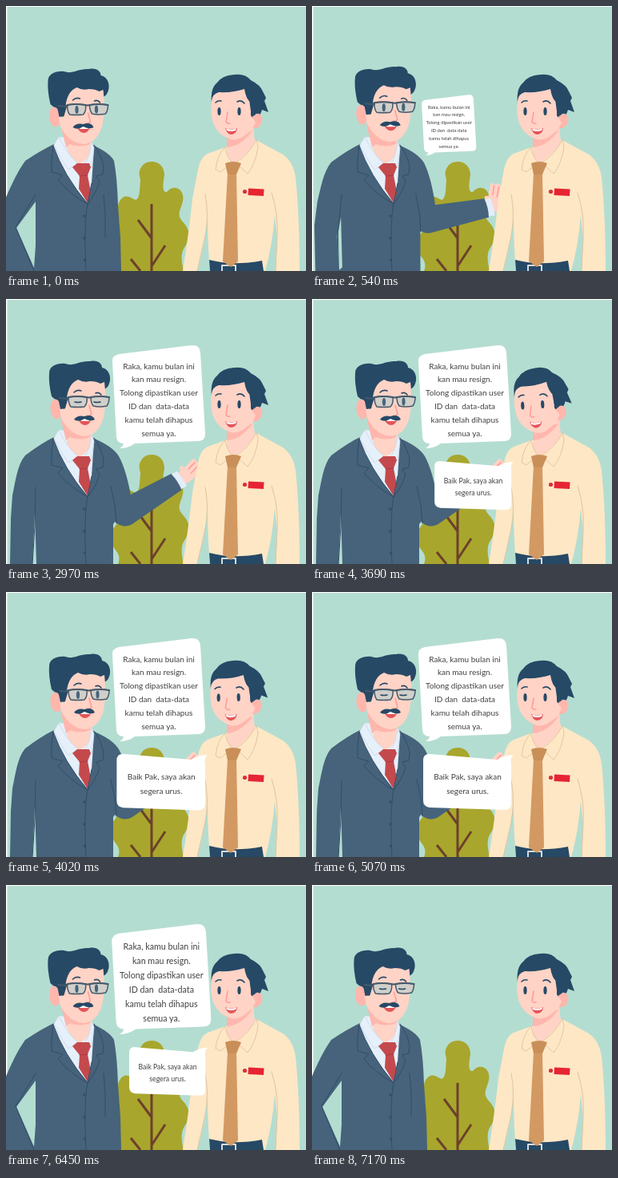
Write an HTML page that moves like this. It is 375x332 px and loops after 7.2 s.

```html
<!DOCTYPE html>
<html lang="id">
<head>
<meta charset="utf-8">
<style>
html, body { margin: 0; width: 100%; height: 100%; overflow: hidden; background: #fff; }
svg { display: block; width: 375px; height: 332px; }
path { stroke-linecap: round; stroke-linejoin: round; }
text { font: 10px Lato, Carlito, sans-serif; fill: #404040; text-anchor: middle; white-space: pre; }
.sky { fill: #b4ddd1; }
.navy { fill: #264966; }
.skin { fill: #ffd3c5; }
.shade { fill: #ffb6ad; }
.suit { fill: #46637b; }
.cream { fill: #fee7c5; }
.seam { fill: none; stroke: #304e69; stroke-width: 1; }
.fold { fill: none; stroke: #dcc5a1; stroke-width: 1; }
.brow { fill: none; stroke: #264966; stroke-width: 1.6; }
.nose { fill: none; stroke: #ff9d99; stroke-width: 1.6; }
.twig { fill: none; stroke: #6c412b; stroke-width: 3; stroke-linecap: butt; }
</style>
</head>
<body>
<svg viewBox="0 0 375 332">
  <rect class="sky" x="1.5" y="1" width="374" height="331"/>

  <g id="plant">
    <path fill="#a8a62d" d="M182 195C192 195 198 202 198 212C196 223 195 234 201 233C206 227 213 226 218 231C224 238 221 246 218 254C214 264 219 268 224 274C231 283 229 293 224 301C218 309 219 318 222 332H140C143 325 141 320 138 316C130 307 131 296 134 288C138 282 143 278 141 268C138 258 139 244 146 240C152 236 157 241 162 243C168 241 167 228 168 218C167 212 165 208 169 202Q173 195 182 195Z"/>
    <path class="twig" d="M182 248V332M182 291L165 268M182 326L199 300M168 332L156 317"/>
  </g>

  <g id="boss">
    <g id="forearm">
      <g id="hand">
        <path class="skin" d="M78 -8L86 -9L88 -14Q92 -15 92 -10L106 -14Q111 -13 109 -9L112 -5L109 1Q100 8 92 8L78 8Z"/>
        <path class="nose" stroke-width="1" d="M96 -6L107 -9M96 0L108 -3"/>
      </g>
      <path fill="#e3eefa" d="M72 -11H82Q84 0 83 11H72Z"/>
      <path class="suit" d="M0 -17L74 -12Q77 0 75 12L0 17A17 17 0 0 1 0 -17Z"/>
    </g>
    <path id="jacket" class="suit"/>
    <path id="gap" class="sky"/>
    <path id="sleeveL" class="seam"/>
    <path id="sleeveR" class="seam"/>
    <g id="chest">
      <path fill="#e6f0fa" d="M66 164L59 175Q72 212 102 247L107 222L110 178L106 168Z"/>
      <path class="skin" d="M70 148L77 182Q83 195 91 198Q101 194 105 185L107 158Z"/>
      <path class="shade" d="M68 148L75 177L80 173Q92 178 105 173L107 158Z"/>
      <path fill="#e6f0fa" stroke="#c5d5e5" stroke-width=".7" d="M66 164L60 174Q66 188 78 205L90 197Q77 187 66 164ZM107 170L110 178L107 203L99 197Q105 188 107 170Z"/>
      <path fill="#c4494d" d="M83 202L89 197H104L106 202L102 212L106 233L102 247L91 229L92 213Z"/>
      <path fill="none" stroke="#a63d45" d="M92 213L102 212"/>
      <path class="seam" d="M59 175Q56 192 57 208L71 212L65 218Q80 236 102 248L107 222M110 174Q119 186 122 201L121 211L113 213L117 220Q112 236 102 248M102 248Q97 275 100 332M59 175Q72 212 102 248"/>
      <g fill="#304e69"><circle cx="98" cy="263" r="1.700"/><circle cx="98" cy="291" r="1.700"/><circle cx="98.500" cy="318" r="1.700"/></g>
    </g>
    <g id="bossHead">
      <path class="navy" d="M64 130L56 123Q52 106 53 94C53 85 63 81 73 82C83 86 91 78 104 79C114 77 119 82 119 87C128 89 131 99 128 107Q126 113 121 114L75 140L67 137Z"/>
      <ellipse class="shade" cx="61.500" cy="139" rx="7" ry="12.500" transform="rotate(-6 61 139)"/>
      <path class="skin" d="M66 138L72 139L75 125Q77 107 89 102Q96 106 104 104Q112 104 117 107L122 105Q125 128 121 149Q115 171 98 173Q79 172 68 150Z"/>
      <path class="navy" d="M64 124H77L73 138L67 139Z"/>
      <path class="brow" d="M84 118Q88 114 93 116M111 119Q115 117 118 121"/>
      <path class="nose" d="M103 134L106 145Q104 148 101 147"/>
      <g fill="#d0cfca" stroke="#46596b" stroke-width="1.500">
        <path d="M77 124Q88 122 100 124Q101 132 97 136Q88 137 80 136Q77 132 77 124ZM105 124Q116 122 128 124Q128 131 125 135Q116 137 108 135Q105 131 105 124Z"/>
        <path fill="none" stroke-width="2" d="M77 124Q88 122 100 124Q102.500 125 105 124Q116 122 128 124M77 126L66 125"/>
      </g>
      <g id="eyesOpen" fill="#47647b"><ellipse cx="89" cy="130" rx="2.100" ry="5"/><ellipse cx="113.500" cy="129.500" rx="2.100" ry="5"/></g>
      <path id="eyesShut" class="brow" d="M85 130Q89 131 93 130M109 130Q113 131 117 130"/>
      <path fill="#e2555a" d="M90 153H105Q103 159 97 159Q92 158 90 153Z"/>
      <path fill="#fff" d="M91 151H104L103 154H93Z"/>
      <path class="navy" d="M84 152Q88 146 97 148Q107 145 110 152Q105 155 97 151Q90 156 84 152Z"/>
    </g>
  </g>

  <g id="clerk">
    <path class="cream" d="M274 177L252 185Q243 189 240 205L233 242Q229 280 221 332H367Q367 265 362 215Q359 195 346 186L313 168Z"/>
    <path class="sky" d="M252 264Q249 295 239 332H255Q252 300 252 264ZM336 262L339 290L337 332H324Q333 300 336 262Z"/>
    <path class="navy" d="M254 318Q284 326 320 319L322 332H255Z"/>
    <path fill="none" stroke="#d8dce0" stroke-width="2" d="M270 333V325H287V333"/>
    <path class="fold" d="M249 236Q254 262 249 288L239 332M332 234Q341 262 339 290L337 332"/>
    <path class="skin" d="M276 158V185Q278 194 285 196Q300 188 311 171L309 150Z"/>
    <path class="shade" d="M276 164V177Q294 176 308 156Z"/>
    <path class="cream" stroke="#dcc5a1" stroke-width=".9" d="M274 177Q264 186 262 205L268 208L283 196Q276 190 274 177ZM313 168Q302 188 287 196L302 210Q312 198 315 177Z"/>
    <path fill="#d39962" d="M277 209H288L290 320L281 327L271 320Z"/>
    <path fill="#c98f58" d="M274 197Q284 193 294 197L288 211H277Z"/>
    <path fill="#e62434" d="M303 228.500L322.500 229.500L322 238L302.500 237Z"/>
    <circle cx="298.500" cy="232.500" r="2.600" fill="#d8323c"/>
    <g id="clerkHead">
      <path class="navy" d="M257 122Q255 103 264 96Q270 87 285 86Q299 84 306 93Q318 99 321 107L325 115L323 119L328 133L320 130Q318 138 312 139L300 140L290 112Z"/>
      <ellipse class="shade" cx="313" cy="144" rx="7" ry="9.500" transform="rotate(25 313 144)"/>
      <path class="skin" d="M257 119Q258 110 266 108Q283 109 298 104Q300 117 306 121L306 137L312 146Q308 156 300 161Q291 169 281 167Q265 162 259 147Q255 135 257 119Z"/>
      <path class="navy" d="M304 117L312 118V136L307 139Z"/>
      <ellipse class="navy" cx="266.500" cy="132" rx="2.100" ry="5"/>
      <ellipse class="navy" cx="291.500" cy="132" rx="2.100" ry="5"/>
      <path class="brow" d="M262 121Q265 118 269 119M289 120Q294 117 298 122"/>
      <path class="nose" d="M277 133L275 145Q277 148 280 147"/>
      <path fill="#e2555a" d="M274 153Q282 156 289 153Q288 161 281 161Q276 160 274 153Z"/>
      <path fill="#fff" d="M275 153.500Q282 156 288 153.500L287 156Q281 158 276 156Z"/>
    </g>
  </g>

  <g id="ask">
    <path fill="#fff" d="M133 79Q132 71 141 69L232 58Q242 57 243 67L249 169Q249 178 240 178L161 181Q153 187 142 187Q147 184 147 181Q139 181 138 173Z"/>
  </g>
  <g id="reply">
    <path fill="#fff" d="M139 211Q139 202 148 203L231 210Q240 204 252 204Q247 208 249 216V265Q249 273 241 273L147 270Q139 269 139 261Z"/>
  </g>
</svg>
<script>
const LOOP = 7200;
const $ = id => document.getElementById(id);

function addText(id, x, y, step, lines) {
  lines.forEach((line, i) => {
    const t = document.createElementNS('http://www.w3.org/2000/svg', 'text');
    t.setAttribute('x', x);
    t.setAttribute('y', y + i * step);
    t.textContent = line;
    $(id).append(t);
  });
}
addText('ask', 191, 87.5, 16.9, ['Raka, kamu bulan ini', 'kan mau resign.', 'Tolong dipastikan user',
  'ID dan  data-data', 'kamu telah dihapus', 'semua ya.']);
addText('reply', 194.5, 235, 17.5, ['Baik Pak, saya akan', 'segera urus.']);

// Path pairs: [arms back, arm reaching out]
const poses = {
  jacket: [
    'M62 172Q45 180 24 194C14 208 6 226 -1 242L-14 275L0 332L144 332L143 290L140 250Q139 215 135 194Q130 184 108 174Z',
    'M62 172Q45 180 24 196C14 208 12 228 8 246L6 275L5 332L134 332L134 282L157 252Q151 215 141 197Q133 184 108 174Z'],
  gap: ['M37 245L13 278L35 328L37 300Z', 'M36 268L35 290L33 332L38 332Z'],
  sleeveL: ['M37 236L12 277L35 332', 'M37 236L36 285L33 332'],
  sleeveR: ['M122 236L124 262L124 290', 'M131 235L136 258L138 281']
};

const clamp = v => Math.min(1, Math.max(0, v));
const span = (t, start, length) => clamp((t - start) / length);
const lerp = (a, b, k) => a + (b - a) * k;
const outCubic = p => 1 - (1 - p) ** 3;
const inOut = p => p * p * (3 - 2 * p);
const inBack = p => 2.70158 * p ** 3 - 1.70158 * p * p;
const outBack = p => 1 - inBack(1 - p);

function morph([a, b], k) {
  const ends = b.match(/-?[\d.]+/g);
  let i = 0;
  return a.replace(/-?[\d.]+/g, n => lerp(+n, +ends[i++], k).toFixed(2) + ' ');
}

const move = (id, value) => $(id).setAttribute('transform', value);

function pop(id, x, y, scale) {
  $(id).style.display = scale > 0.005 ? '' : 'none';
  move(id, `translate(${x} ${y}) scale(${scale}) translate(${-x} ${-y})`);
}

function draw(t) {
  const rise = span(t, 290, 535);
  const reach = outCubic(rise) - inOut(span(t, 5070, 330));
  for (const id in poses) $(id).setAttribute('d', morph(poses[id], reach));
  move('forearm', `translate(${lerp(123, 149, reach)} 267.5) rotate(${lerp(100, -31, reach)})`);
  move('hand', `rotate(${-60 * clamp((1 - reach) * 6)} 82 0)`);
  const bob = 2 * Math.sin(Math.PI * rise);
  move('bossHead', `translate(${lerp(-.5, 1, reach)} ${-reach - bob})`);

  const shut = t > 800 && (t - 870 + 2100) % 2100 < 120;
  $('eyesShut').style.display = shut ? '' : 'none';
  $('eyesOpen').style.display = shut ? 'none' : '';

  const nod = -4.6 * Math.sin(Math.PI * span(t, 3550, 500));
  move('clerkHead', `rotate(${nod} 291 185)`);

  pop('ask', 143, 187, outBack(span(t, 462, 500)) - inBack(span(t, 6320, 490)));
  pop('reply', 251, 204, outBack(span(t, 3550, 500)) - inBack(span(t, 6095, 490)));
}

let start;
function tick(now) {
  start ??= now;
  draw((now - start) % LOOP);
  requestAnimationFrame(tick);
}
draw(0);
requestAnimationFrame(tick);
</script>
</body>
</html>
```
